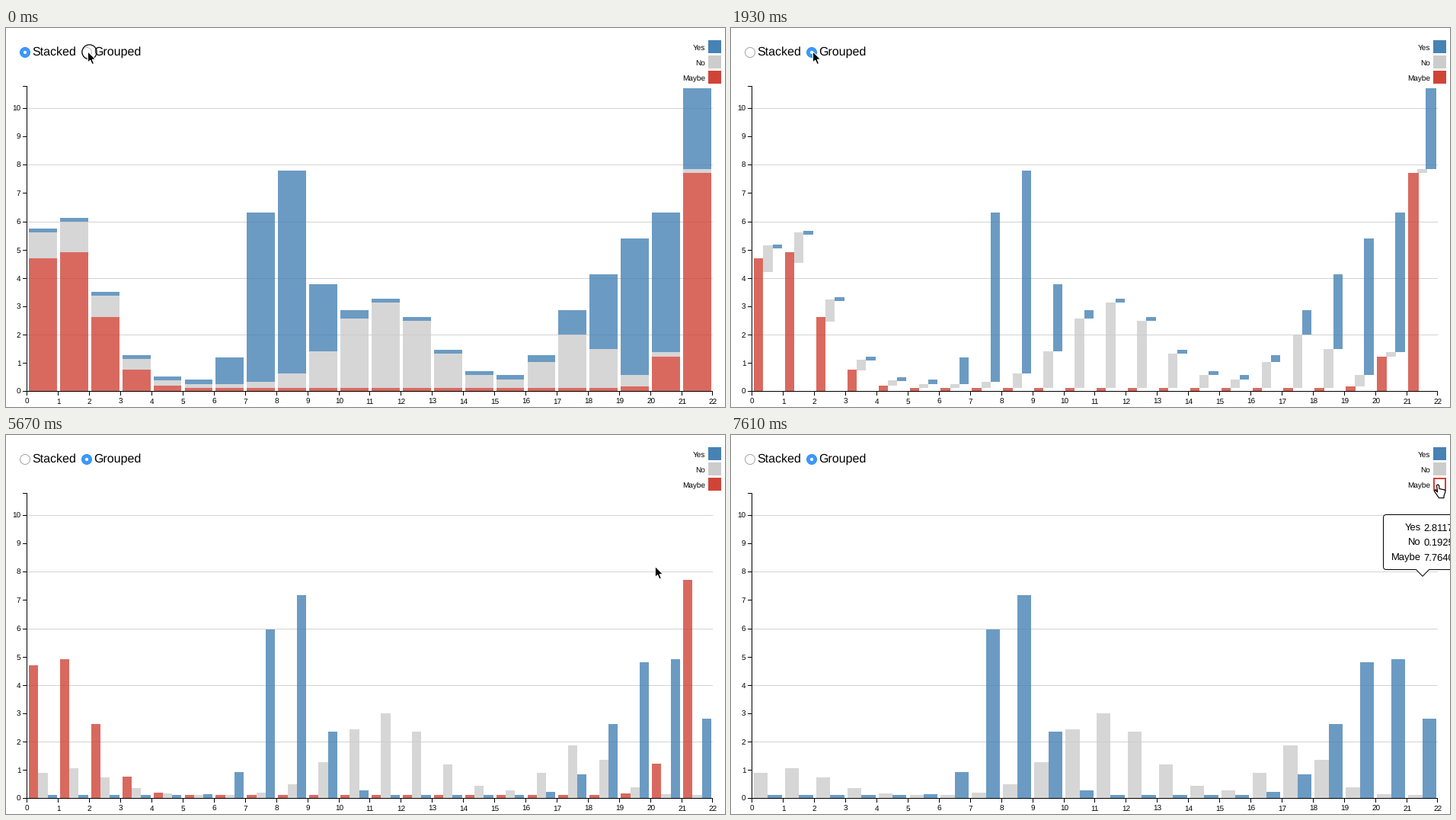
Write a matplotlib script that moves like this. It is 944 px wide and 497 px high and loops after 8000 ms.

```python
import numpy as np
import matplotlib.pyplot as plt
from matplotlib.animation import FuncAnimation
from matplotlib.collections import PolyCollection
from matplotlib.colors import to_rgba
from matplotlib.patches import Circle, FancyBboxPatch, Polygon, Rectangle

W, H, DPI = 944, 497, 64
LOOP, INTERVAL = 8000, 20
PX = 72 / DPI  # points per pixel

LEFT, BASE, UNIT = 28, 477, 37.146
COUNT = 22
STEP = 900 / COUNT
BAND = 0.9 * STEP
BLUE, GREY, RED = "#4682b4", "#cccccc", "#d04437"
COLORS = [RED, GREY, BLUE]
INDEX = np.arange(COUNT)
LAYER = np.arange(3)[:, None]

GROUP_AT, TOGGLE_AT, TOOLTIP_AT = 1398, 6275, 5820
CLICKS = [(0, 440, 109.5, 31.5), (1480, 300, 109.5, 31.5), (6400, 150, 929.5, 63.5)]
# Cursor key points: time, x, y
PATH = np.array([(2520, 107.5, 31), (4320, 90.5, 33), (4470, 74, 33), (4770, 355.5, 35),
                 (5370, 767, 87), (5820, 895, 215), (6110, 926.5, 65)]).T
# The picture refreshes only at these moments
TICKS = np.round(np.concatenate([np.linspace(0, 440, 4), np.linspace(1480, 2520, 8),
                                 np.linspace(4320, 7610, 23)]), -1)

SHAPES = {
    "arrow": [(0, 0), (0, 14), (3.2, 11.2), (5.6, 16.6), (8, 15.6), (5.7, 10.3),
              (10, 10)],
    "beam": [(-3, -8), (3, -8), (0, -8), (0, 8), (-3, 8), (3, 8)],
    "hand": [(0, 1), (1.5, 0), (3, 1), (3.6, 5.5), (10.5, 7), (11.5, 9), (9.5, 15),
             (9.5, 17.5), (3, 17.5), (-3.2, 8.5), (-2, 7.2), (1.2, 10)],
}


def bumps(*peaks):
    """Bar heights in pixels: a low floor plus bell curves (height, centre, sharpness)."""
    return 5 + sum(a * np.exp(-k * (INDEX - c)**2) for a, c, k in peaks)


HEIGHTS = np.array([
    bumps((190, 0.57, 0.35), (680, 22.27, 0.545)),
    bumps((35.4, 0.8, 0.29), (107, 10.96, 0.235), (66, 17.2, 0.58)),
    bumps((235, 7.41, 1.05), (108, 8.3, 1), (190, 19.54, 0.3)),
])
OFFSETS = np.cumsum(HEIGHTS, axis=0) - HEIGHTS

plt.rcParams["font.family"] = "Liberation Sans"
plt.rcParams["text.hinting"] = "none"
fig = plt.figure(figsize=(W / DPI, H / DPI), dpi=DPI, facecolor="white")
ax = fig.add_axes([0, 0, 1, 1])
ax.set_xlim(0, W)
ax.set_ylim(H, 0)
ax.axis("off")


def rect(x, y, w, h, color, z):
    ax.add_patch(Rectangle((x, y), w, h, fc=color, lw=0, aa=False, zorder=z))


def label(x, y, text, size=10, ha="left", z=4):
    return ax.text(x, y, text, size=size * PX, ha=ha, va="baseline", zorder=z)


def draw_axes():
    for n in range(11):
        y = int(BASE - UNIT * n - 0.05)
        rect(22, y, 6, 1, "black", 3)
        label(19.5, y + 4, str(n), ha="right")
        if n and n % 2 == 0:
            rect(LEFT, y, 900, 1, "#d3d3d3", 1)
    rect(22, 76, 6, 1, "black", 3)
    rect(27, 76, 1, 401, "black", 3)
    rect(27, 476, 901, 1, "black", 3)
    for i in range(COUNT + 1):
        x = int(LEFT + STEP * i - 0.05)
        rect(x, 476, 1, 6, "black", 3)
        label(x + 0.7, 493, str(i), ha="center")


def draw_legend():
    for row, (name, color) in enumerate(zip(["Yes", "No", "Maybe"], COLORS[::-1])):
        y = 16 + 20 * row
        box = ax.add_patch(Rectangle((923, y + 1), 15, 15, fc=color, ec=color,
                                     lw=2 * PX, zorder=4))
        label(918, y + 13, name, ha="right")
    return box


def draw_radio(x, text):
    ring = ax.add_patch(Circle((x, 32), 6.5, lw=PX, zorder=4))
    dot = ax.add_patch(Circle((x, 32), 2.1, fc="white", lw=0, zorder=5))
    label(x + 9, 36, text, size=16)
    return ring, dot


def draw_tooltip():
    style = dict(fc="white", ec="black", lw=PX)
    parts = [
        ax.add_patch(FancyBboxPatch((856.5, 104.5), 103, 72, zorder=6,
                                    boxstyle="round,pad=0,rounding_size=4", **style)),
        ax.add_patch(Polygon([(899, 176), (908, 185.3), (917, 176)], closed=False,
                             zorder=6.1, **style)),
    ]
    rows = [("Yes", "2.8117"), ("No", "0.1925"), ("Maybe", "7.7640")]
    for row, (name, value) in enumerate(rows):
        y = 126 + 19.2 * row
        parts.append(label(905.5, y, name, 13, "right", 7))
        parts.append(label(909, y, value, 13, "left", 7))
    return parts


def draw_cursors():
    looks = {"arrow": dict(fc="black", ec="white", lw=PX),
             "beam": dict(fill=False, ec="black", lw=PX, closed=False),
             "hand": dict(fc="white", ec="black", lw=1.2 * PX)}
    return {kind: ax.add_patch(Polygon(SHAPES[kind], zorder=9, **look))
            for kind, look in looks.items()}


draw_axes()
maybe_box = draw_legend()
radios = [draw_radio(25, "Stacked"), draw_radio(106, "Grouped")]
tooltip = draw_tooltip()
cursors = draw_cursors()
click = ax.add_patch(Circle((0, 0), 9.6, lw=1.2 * PX, zorder=8))
bars = ax.add_collection(PolyCollection(
    [], facecolors=[to_rgba(c, 0.8) for c in COLORS for _ in INDEX],
    linewidths=0, zorder=2))


def ease(u):
    u = np.clip(u, 0, 1)
    return np.where(u < 0.5, 4 * u**3, 1 - 4 * (1 - u)**3)


def two_phases(t, start, duration):
    u = (t - start) / duration - 0.025 * INDEX
    return ease(u), ease(u - 1)


def bar_corners(t):
    spread, drop = two_phases(t, GROUP_AT, 412)
    hide, widen = two_phases(t, TOGGLE_AT, 480)
    width = BAND * (1 - spread * 2 / 3 + widen / 6)
    shift = LAYER * spread / 3 * (1 - widen) + (LAYER - 1) / 2 * widen
    x = LEFT + STEP * (INDEX + 0.05) + BAND * shift
    bottom = BASE - OFFSETS * (1 - drop)
    top = bottom - HEIGHTS * np.where(LAYER == 0, 1 - hide, 1)
    xs = np.stack([x, x + width, x + width, x], axis=-1)
    ys = np.stack([bottom, bottom, top, top], axis=-1)
    corners = np.stack([xs, ys], axis=-1).reshape(-1, 4, 2)
    return np.ceil(corners - 0.5 - 1e-6)  # crisp pixel edges


def cursor_kind(x, y):
    if y < 75 and x > 921:
        return "hand"
    return "beam" if y < 45 and 34 < x < 95 else "arrow"


def update(frame):
    now = frame * INTERVAL + INTERVAL / 2
    t = TICKS[TICKS <= now][-1]
    bars.set_verts(bar_corners(t))

    chosen = int(t >= GROUP_AT)
    for i, (ring, dot) in enumerate(radios):
        on = i == chosen
        ring.set_facecolor("#3b99fc" if on else "white")
        ring.set_edgecolor("#3490f3" if on else "#a6a6a6")
        dot.set_visible(on)
    maybe_box.set_facecolor("white" if t >= TOGGLE_AT else RED)
    for part in tooltip:
        part.set_visible(t >= TOOLTIP_AT)

    x, y = (np.interp(t, PATH[0], axis) for axis in PATH[1:])
    kind = cursor_kind(x, y)
    for name, shape in cursors.items():
        shape.set_visible(name == kind)
    cursors[kind].set_xy(np.array(SHAPES[kind]) + (x, y))

    start, life, x, y = [c for c in CLICKS if c[0] <= t][-1]
    strength = max(0, 1 - (t - start) / life)
    click.set_visible(strength > 0)
    click.center = x, y
    click.set_facecolor((1, 1, 1, 0.25 * strength))
    click.set_edgecolor((0, 0, 0, strength))
    return []


anim = FuncAnimation(fig, update, frames=LOOP // INTERVAL, interval=INTERVAL,
                     repeat=True, repeat_delay=0, init_func=lambda: [])
plt.show()
```
